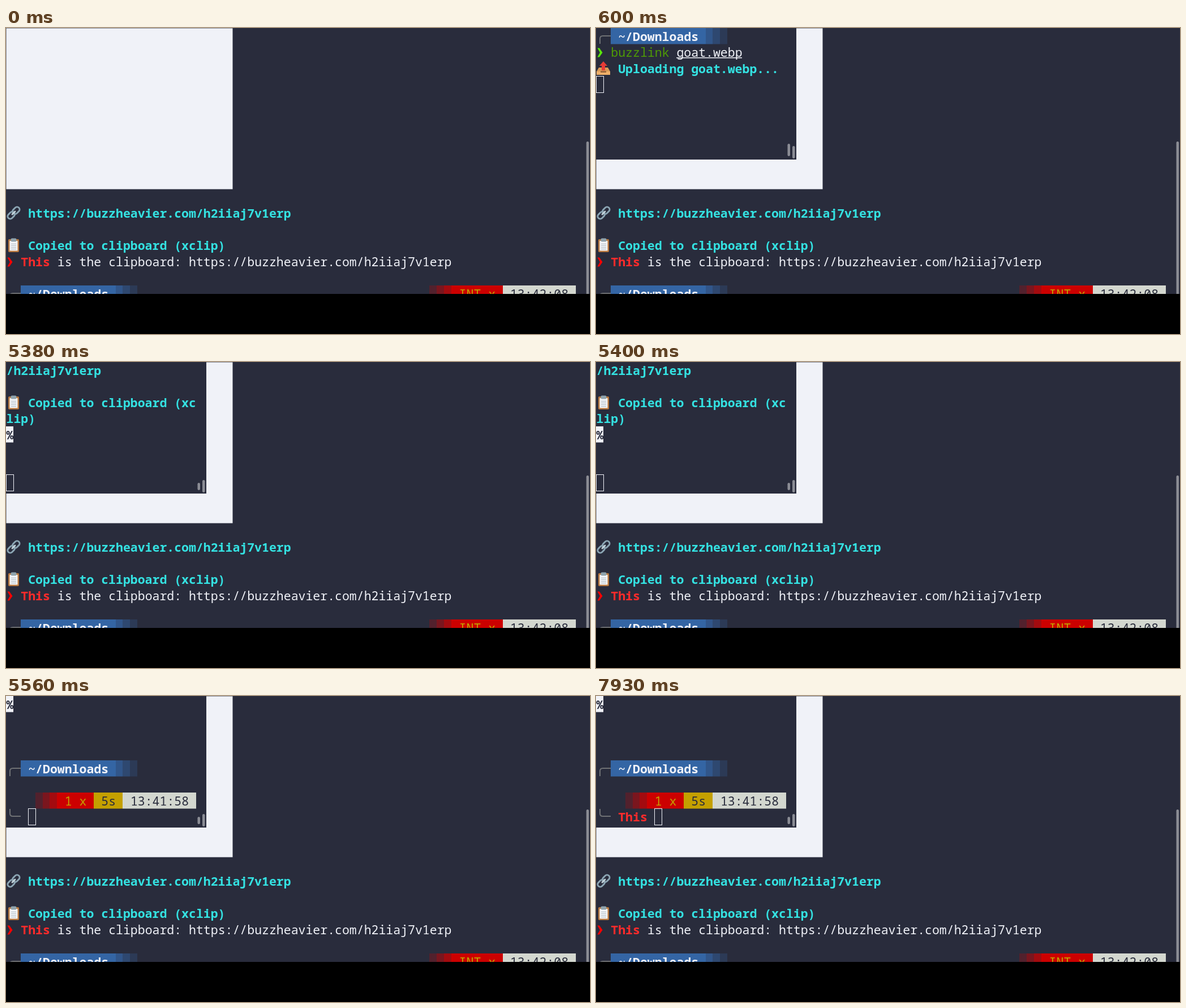
These frames come from a looping animation (1032 by 542 pixels, 8 s). An HTML page with a canvas:

```html
<!DOCTYPE html>
<html lang="en">
<head>
<meta charset="utf-8">
<title>Terminal upload</title>
<style>
  html, body { margin: 0; width: 100%; height: 100%; overflow: hidden; background: #000; }
  canvas { display: block; }
</style>
</head>
<body>
<canvas id="stage" width="1032" height="542"></canvas>
<script>
const ctx = document.getElementById('stage').getContext('2d');
const LOOP = 8000, COL = 12.905, ROW = 28.5;
const DARK = '#292c3c', LIGHT = '#f0f2f8', CYAN = '#34e2e2', RED = '#cc0000',
      BLUE = '#3465a4', GOLD = '#c4a000', SILVER = '#d3d7cf', GREY = '#8b8d95';
const LINK = 'https://buzzheavier.com/h2iiaj7v1erp';

const rowTop = row => Math.floor(row * ROW);

function rect(x, y, w, h, color) {
  ctx.fillStyle = color;
  ctx.fillRect(x, y, w, h);
}

function pill(x, y, w, h, color, radius = w / 2) {
  ctx.fillStyle = color;
  ctx.beginPath();
  ctx.roundRect(x, y, w, h, radius);
  ctx.fill();
}

function stroke(path, color, width) {
  ctx.strokeStyle = color;
  ctx.lineWidth = width;
  ctx.stroke(new Path2D(path));
}

function cells(col, row, count, color, alpha = 1) {
  const left = Math.round(col * COL), right = Math.round((col + count) * COL);
  ctx.globalAlpha = alpha;
  rect(left, rowTop(row), right - left, 28.5, color);
  ctx.globalAlpha = 1;
}

function text(col, row, string, color = LIGHT, bold = false) {
  ctx.font = `${bold ? 700 : 500} 21.5px "Noto Sans Mono", "DejaVu Sans Mono", monospace`;
  ctx.fillStyle = color;
  ctx.fillText(string, col * COL + .5, row * ROW + 22.6);
}

function at(row, draw) {
  ctx.save();
  ctx.translate(0, rowTop(row));
  draw();
  ctx.restore();
}

const icons = {
  link() {
    ctx.translate(13.5, 14.5);
    ctx.rotate(-Math.PI / 4);
    ctx.strokeStyle = '#8ba5b3';
    ctx.lineWidth = 3;
    for (const x of [-13, -1]) {
      ctx.beginPath();
      ctx.roundRect(x, -4.5, 14, 9, 4.5);
      ctx.stroke();
    }
    pill(-5, -1.5, 10, 3, '#c0d0d8', 1.5);
  },
  clipboard() {
    pill(4, 4, 19, 23, '#b9793f', 2);
    rect(6.5, 7, 14, 17.5, '#f3f5f7');
    pill(8.5, 2.5, 10, 6, '#8fa3ad', 2);
    for (let y = 12; y < 23; y += 3) rect(9, y, 9, 1, '#a9b8c4');
  },
  outbox() {
    ctx.fillStyle = '#d99a55';
    ctx.fill(new Path2D('M5 13H21L25 20V26H1V20Z'));
    rect(1, 20, 24, 6, '#efb069');
    rect(8, 19, 10, 3, '#9f673b');
    ctx.fillStyle = '#e63b36';
    ctx.fill(new Path2D('M13 2L20 10H16V18H10V10H6Z'));
  },
  check() {
    pill(2, 3, 23, 23, '#43a047', 3);
    stroke('M6.5 15L11.5 20L20.5 8', '#fff', 3.5);
  }
};

function iconLine(row, icon, string, color = CYAN) {
  at(row, icons[icon]);
  text(3, row, string, color, true);
}

function chevron(row, color) {
  at(row, () => {
    ctx.fillStyle = color;
    ctx.fill(new Path2D('M2.5 7.5H6L11.5 15.5L6 23.5H2.5L7 15.5Z'));
  });
}

function directory(row) {
  at(row, () => stroke('M7 28V19Q7 14 12 14H26', '#6f7174', 2));
  cells(2, row, 13, BLUE);
  [.75, .5, .25].forEach((alpha, i) => cells(15 + i, row, 1, BLUE, alpha));
  text(3, row, '~/Downloads', LIGHT, true);
}

function status(col, row, label, clock, duration) {
  [.25, .5, .75].forEach((alpha, i) => cells(col + i, row, 1, RED, alpha));
  col += 3;
  const badge = (string, fill, color) => {
    cells(col, row, string.length + 2, fill);
    text(col + 1, row, string, color);
    col += string.length + 2;
  };
  badge(label, RED, GOLD);
  if (duration) badge(duration, GOLD, DARK);
  badge(clock, SILVER, DARK);
}

function cursor(col, row) {
  ctx.strokeStyle = LIGHT;
  ctx.lineWidth = 1;
  ctx.strokeRect(Math.round(col * COL) + .5, rowTop(row) + .5, 13, 29);
}

function noNewline(row) {
  cells(0, row, 1, LIGHT);
  text(0, row, '%', DARK, true);
}

function uploading(t) {
  directory(0);
  chevron(1, '#59e60b');
  text(2, 1, 'buzzlink', '#4e9a06');
  text(11, 1, 'goat.webp');
  rect(142, 52, 116, 1.5, LIGHT);
  if (t >= 600) iconLine(2, 'outbox', 'Uploading goat.webp...');
  if (t >= 5280) iconLine(3, 'check', 'Uploaded successfully!', '#8ae234');
  cursor(0, t < 600 ? 2 : t < 5280 ? 3 : 4);
}

function copied() {
  text(0, 0, '/h2iiaj7v1erp', CYAN, true);
  iconLine(2, 'clipboard', 'Copied to clipboard (xc');
  text(0, 3, 'lip)', CYAN, true);
  noNewline(4);
  cursor(0, 7);
}

function prompt(t) {
  noNewline(0);
  directory(4);
  status(4, 6, '1 x', '13:41:58', '5s');
  at(7, () => stroke('M7 1V9Q7 14 12 14H26', '#6f7174', 2));
  const typed = 'This '.slice(0, [7260, 7530, 7630, 7730, 7930].filter(s => t >= s).length);
  const unchecked = t < 7360;
  text(3, 7, typed, unchecked ? LIGHT : '#ff2b2b', !unchecked);
  cursor(3 + typed.length, 7);
}

function smallTerminal(t) {
  rect(0, 0, 354, 233, DARK);
  (t < 5380 ? uploading : t < 5500 ? copied : prompt)(t);
  const top = t < 5380 ? 205 : 214;
  pill(338.5, top, 4.5, 227 - top, GREY);
  pill(347, 209, 4.5, 22, GREY);
}

function mainTerminal() {
  rect(0, 0, 1032, 542, DARK);
  rect(.5, .5, 400, 285, LIGHT);
  iconLine(11, 'link', LINK);
  iconLine(13, 'clipboard', 'Copied to clipboard (xclip)');
  chevron(14, '#f00');
  text(2, 14, 'This', '#ff2b2b', true);
  text(7, 14, 'is the clipboard: ' + LINK);
  directory(16);
  status(58, 16, 'INT x', '13:42:08');
  pill(1025.5, 201, 4.5, 290, GREY);
  rect(0, 471, 1032, 71, '#000');
}

const start = performance.now();
function frame() {
  const t = (performance.now() - start) % LOOP;
  mainTerminal();
  if (t >= 500) smallTerminal(t);
  requestAnimationFrame(frame);
}
frame();
</script>
</body>
</html>
```
